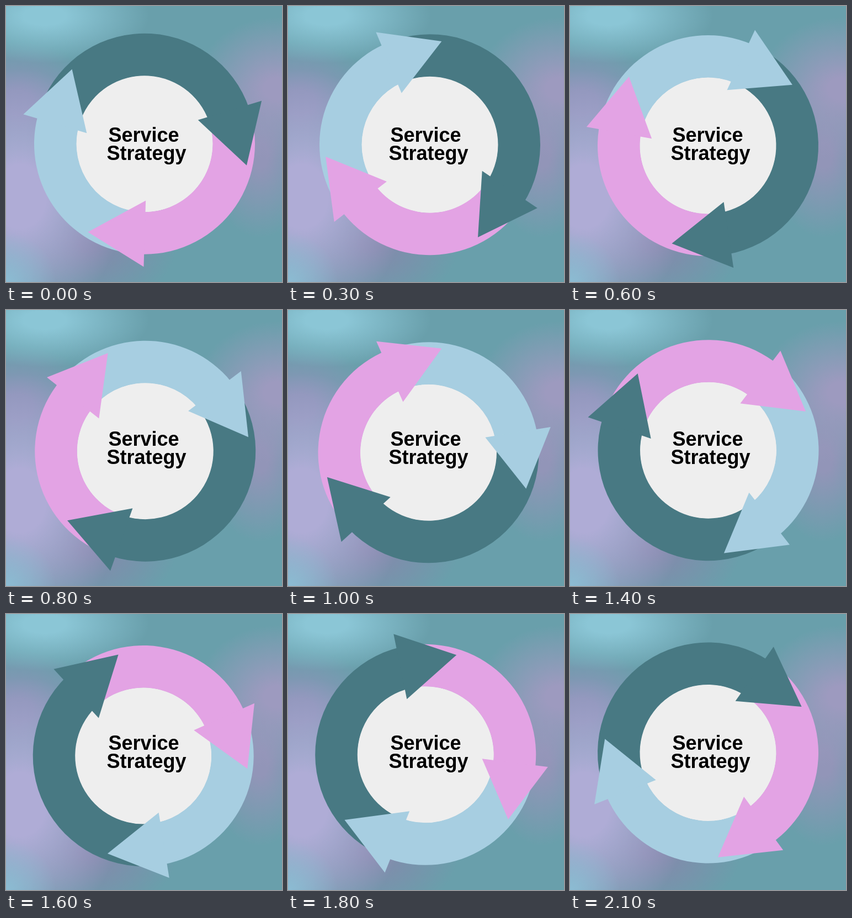
An HTML page that plays this animation: 500x500 px, repeating every 2200 ms.

```html
<!DOCTYPE html>
<html lang="en">
<head>
<meta charset="utf-8">
<title>Service Strategy</title>
<style>
  html, body { margin: 0; width: 100%; height: 100%; overflow: hidden; }
  body {
    background:
      radial-gradient(ellipse 190px 85px at 70px 18px, #8bc6d6 20%, #8bc6d600),
      radial-gradient(ellipse 90px 90px at 0 500px, #8cbcd3, #8cbcd300),
      radial-gradient(ellipse 190px 230px at 25px 345px, #afacd6 25%, #afacd600),
      radial-gradient(ellipse 150px 110px at 20px 175px, #8c93b8 20%, #8c93b800),
      radial-gradient(ellipse 160px 120px at 150px 430px, #8489ac 10%, #8489ac00),
      radial-gradient(ellipse 150px 130px at 490px 150px, #9d9abf 15%, #9d9abf00),
      radial-gradient(ellipse 100px 150px at 460px 270px, #9295b8 15%, #9295b800),
      #699fab;
  }
  svg { display: block; width: 100%; height: 100%; }
  text { font: bold 36px "Liberation Sans", Arial, sans-serif; }
</style>
</head>
<body>
<svg viewBox="0 0 500 500">
  <g id="wheel"><circle r="124" fill="#eee"/></g>
  <text x="185.5" y="246">Service</text>
  <text x="182.5" y="279">Strategy</text>
</svg>
<script>
const wheel = document.getElementById("wheel");
const STEP = 100, STEPS = 22;
const INNER = 123.5, OUTER = 200;

// Arrowhead corners as [radius, degrees]; the ring section runs from one angle to the other.
const arrows = [
  { color: "#487983", from: 201, to: 346, head: [[226, -20.2], [189, 11.9], [106, -24]] },
  { color: "#e3a3e4", from: -14, to: 97, head: [[222.7, 90.4], [190, 122.7], [102.7, 88.8]] },
  { color: "#a7cee1", from: 97, to: 201, head: [[226, 193.7], [188.5, 225.8], [106.5, 190.5]] }
];

// Step, centre x, centre y, turn in degrees
const keys = [
  [0, 251, 249.7, 0],
  [3, 257, 251.2, 50.7],
  [6, 250, 253, 98.4],
  [10, 254.5, 258.3, 154.5],
  [12, 252.3, 251.3, 186.8],
  [16, 248.7, 257, 244.3],
  [21, 250, 251.5, 321.9]
];

const polar = (r, deg) => {
  const a = deg * Math.PI / 180;
  return [r * Math.cos(a), r * Math.sin(a)].map(v => v.toFixed(2)).join(" ");
};

function addPath(d, fill) {
  const path = document.createElementNS("http://www.w3.org/2000/svg", "path");
  path.setAttribute("d", d);
  path.setAttribute("fill", fill);
  wheel.append(path);
}

for (const { color, from, to } of arrows)
  addPath(`M${polar(OUTER, from)}A${OUTER} ${OUTER} 0 0 1 ${polar(OUTER, to)}
    L${polar(INNER, to)}A${INNER} ${INNER} 0 0 0 ${polar(INNER, from)}Z`, color);
for (const { color, head } of arrows)
  addPath("M" + head.map(p => polar(...p)).join("L") + "Z", color);

function pose(step) {
  const i = Math.max(1, keys.findIndex(k => k[0] >= step));
  const a = keys[i - 1], b = keys[i];
  const u = (step - a[0]) / (b[0] - a[0]);
  return a.map((v, j) => v + (b[j] - v) * u);
}

function draw(now) {
  const [, x, y, turn] = pose(Math.floor(now / STEP) % STEPS);
  wheel.setAttribute("transform", `translate(${x} ${y}) rotate(${turn})`);
  requestAnimationFrame(() => draw(performance.now() - start));
}

const start = performance.now();
draw(0);
</script>
</body>
</html>
```
